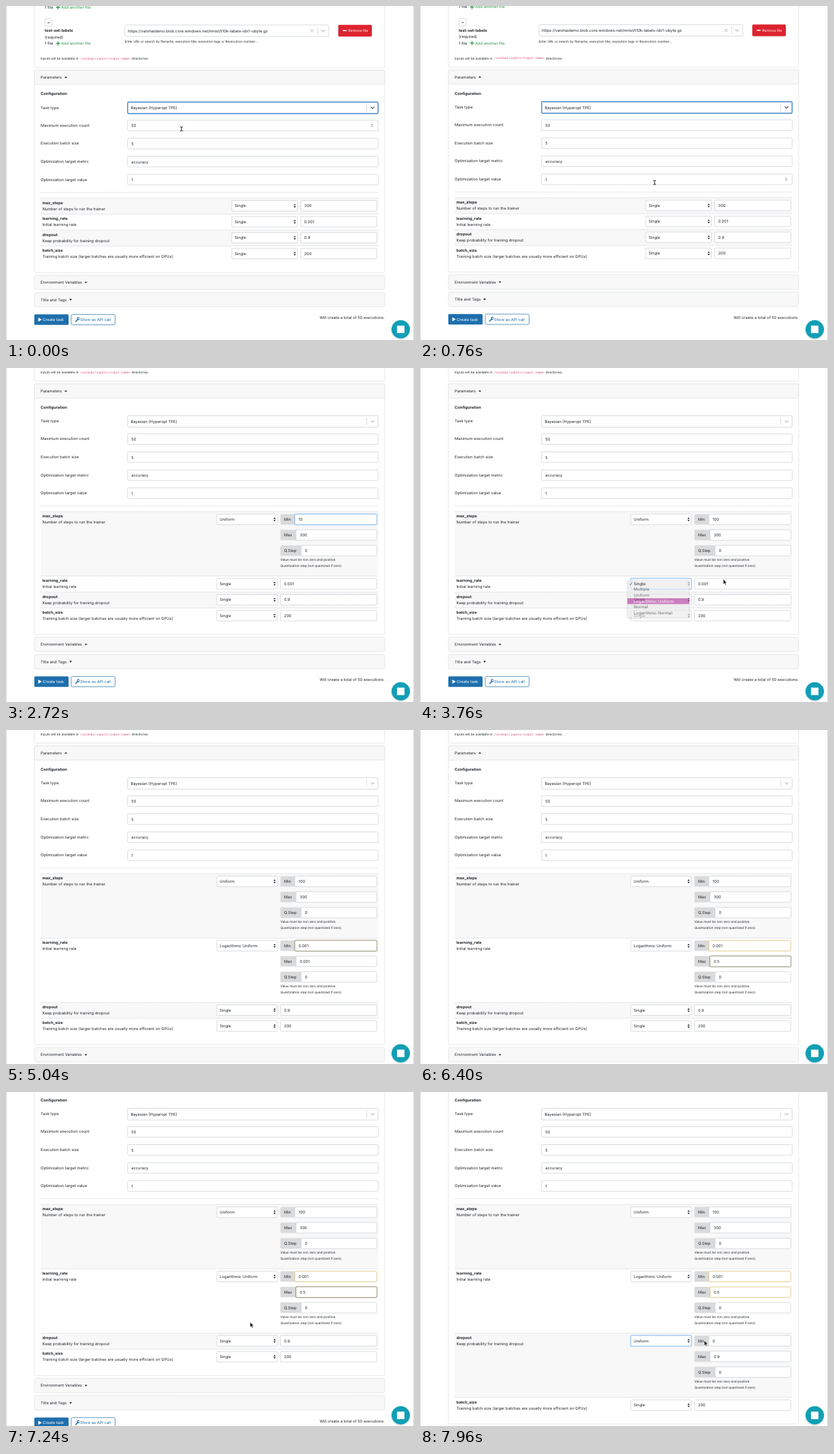
Recreate the animation shown at these times as an HTML page. Size 600x492 px, loop 8 s.

```html
<!DOCTYPE html>
<html lang="en">
<head>
<meta charset="utf-8">
<title>Hyperparameter task form</title>
<style>
  html, body { margin: 0; width: 100%; height: 100%; overflow: hidden; background: #fff; }
  svg { display: block; width: 600px; height: 492px; }
  text { font: 5.77px Inter, "Open Sans", sans-serif; fill: #20252a; text-rendering: geometricPrecision; white-space: pre; }
  .bold { font-weight: 700; }
  .small { font-size: 4.73px; }
  .menu { font-size: 6.1px; }
  .code { font: 4.39px "DejaVu Sans Mono", monospace; fill: #d6437f; }
  .green { fill: #2d9a48; }
  .blue { fill: #1c6ba8; }
  .white { fill: #fff; }
  .end { text-anchor: end; }
  .card { fill: #fff; stroke: #e1e3e5; stroke-width: .8; }
  .head { fill: #f8f8f9; stroke: #e1e3e5; stroke-width: .8; }
  .field { fill: #fff; stroke: #ced3d8; stroke-width: .8; }
  .dash { stroke: #d3d6d9; stroke-width: .8; stroke-dasharray: 1.6 .8; }
  .line { fill: none; stroke-width: 1; stroke-linecap: round; stroke-linejoin: round; }
</style>
</head>
<body>
<svg viewBox="0 0 600 492">
  <g id="page">
    <g id="top"></g>
    <g id="rows"></g>
    <g id="foot"></g>
  </g>
  <g id="menu"></g>
  <path d="M.4 0V492M599.6 0V492" stroke="#c9c9c9" stroke-width=".8"/>
  <circle cx="580.5" cy="477.5" r="14.6" fill="#000" opacity=".08"/>
  <circle cx="580.5" cy="476.3" r="13.5" fill="#109fb6"/>
  <rect x="575" y="470.8" width="11" height="11" fill="#fff"/>
  <path id="arrow" d="M0 0V7.6L1.8 6L3 8.7L4.3 8.1L3.1 5.5H5.4Z" fill="#111" stroke="#fff" stroke-width=".6"/>
  <path id="beam" class="line" d="M-1.6 -3.2Q0 -3.2 0 -2V2Q0 3.2 -1.6 3.2M1.6 -3.2Q0 -3.2 0 -2M0 2Q0 3.2 1.6 3.2" stroke="#222" stroke-width=".8"/>
</svg>
<script>
const LOOP = 8000, ROW = 23.5, EXTRA = 71.3, ROWS_TOP = 283, ITEM = 8.55;
const $ = id => document.getElementById(id);

// Drawing helpers: text and boxes are placed by their vertical centre.
const esc = s => s.replace(/&/g, '&amp;').replace(/</g, '&lt;');
const text = (x, cy, s, cls = '') => `<text x="${x}" y="${cy + 2.1}" class="${cls}">${esc(s)}</text>`;
const rect = (x, y, w, h, attrs, r = 1.6) =>
  `<rect x="${x}" y="${y}" width="${w}" height="${h}" rx="${r}" ${attrs}/>`;
const line = (d, color, width = 1) => `<path class="line" d="${d}" style="stroke:${color};stroke-width:${width}"/>`;
const dash = y => `<path class="dash" d="M51 ${y}H547.5"/>`;
const tri = (x, y, w, h, color = '#222') => `<path d="M${x - w} ${y}h${2 * w}l${-w} ${h}z" fill="${color}"/>`;

const ring = {
  blue: ['#8dbfee', '#80bdff'],
  warn: ['#e3c683', 'none'],
  warnFocus: ['#a5a086', '#8f8b70'],
};
function field(x, cy, w, state, h = 15.6) {
  const y = cy - h / 2, [stroke, glow] = ring[state] || [];
  if (!stroke) return rect(x, y, w, h, 'class="field"');
  return rect(x, y, w, h, `fill="none" stroke="${glow}" stroke-width="2.4" opacity=".4"`) +
    rect(x, y, w, h, `fill="#fff" stroke="${stroke}" stroke-width=".9"`);
}
const select = (x, cy, w, s, state) => field(x, cy, w, state) + text(x + 4.2, cy, s) +
  tri(x + w - 4, cy - .7, 1.7, -2.2) + tri(x + w - 4, cy + .7, 1.7, 2.2);
const chevron = (x, cy, color) => line(`M${x - 2.3} ${cy - 1.1}l2.3 2.3l2.3 -2.3`, color, 1.1);
const plus = (x, cy) => line(`M${x} ${cy}h5M${x + 2.5} ${cy - 2.5}v5`, '#2d9a48', 1.3);
const header = (y, s, x, up) => rect(41.8, y, 515, 21, 'class="head"') + text(51, y + 10.4, s) +
  tri(x, y + (up ? 11.5 : 9.6), 2, up ? -2.3 : 2.3);

const settings = [
  ['Task type', 150, 'Bayesian (Hyperopt TPE)'],
  ['Maximum execution count', 176, '50'],
  ['Execution batch size', 202.6, '5'],
  ['Optimization target metric', 229.2, 'accuracy'],
  ['Optimization target value', 255.8, '1'],
];
const params = [
  ['max_steps', 'Number of steps to run the trainer', '300'],
  ['learning_rate', 'Initial learning rate', '0.001'],
  ['dropout', 'Keep probability for training dropout', '0.9'],
  ['batch_size', 'Training batch size (larger batches are usually more efficient on GPUs)', '200'],
];
const kinds = ['Single', 'Multiple', 'Uniform', 'Logarithmic Uniform', 'Normal', 'Logarithmic Normal'];

// Timeline
const menus = [
  { row: 0, open: 1360, choice: 2, pick: 1780, close: 1960 },
  { row: 1, open: 3320, choice: 3, pick: 3640, close: 3840 },
  { row: 2, open: 7440, choice: 2, pick: 7660, close: 7820 },
];
const focusKeys = [[0, 'task'], [1360, 'kind0'], [2500, 'Min0'], [3320, 'kind1'], [4240, 'Min1'], [5680, 'Max1'], [7440, 'kind2']];
const typing = {
  Min0: { start: 2600, step: 80, value: '100' },
  Min1: { start: 4400, step: 150, value: '0.001' },
  Max1: { start: 5960, step: 120, value: '0.5' },
};
const scrollKeys = [[0, 0], [300, 0], [760, .5], [1000, 0], [2080, 0], [2400, EXTRA], [6560, EXTRA], [7160, EXTRA + 46]];
const mouseKeys = [
  [0, 258, 181], [80, 258, 181], [760, 345, 260], [1240, 384, 294], [1440, 384, 294], [1640, 362, 313],
  [1860, 362, 313], [2100, 400, 262], [2440, 450, 223], [2960, 450, 223], [3240, 352, 318], [3400, 352, 318],
  [3580, 346, 343], [3640, 346, 343], [3760, 446, 311], [4120, 450, 317], [5120, 450, 317], [5380, 450, 318],
  [5640, 452, 341], [6440, 452, 341], [7080, 359, 339], [7240, 359, 339], [7380, 356, 365], [7460, 356, 365],
  [7600, 352, 383], [7680, 352, 383], [7920, 418, 366],
];
const mouseHidden = [[2560, 2960], [4360, 5120], [5800, 6460]];

const ease = p => p * p * (3 - 2 * p);
function track(keys, t) {
  const next = keys.findIndex(k => k[0] > t);
  if (next < 0) return keys[keys.length - 1].slice(1);
  const a = keys[next - 1], b = keys[next], p = ease((t - a[0]) / (b[0] - a[0]));
  return a.slice(1).map((v, i) => v + (b[i + 1] - v) * p);
}

const expanded = (row, t) => menus.some(m => m.row === row && t >= m.close);
const extraAbove = (row, t) => menus.filter(m => m.row < row && t >= m.close).length * EXTRA;
const rowTop = (row, t) => ROWS_TOP + row * ROW + extraAbove(row, t);

function drawTop(focus, hover) {
  const task = focus === 'task';
  let s = rect(41.8, -20, 515, 110.6, 'class="card"') +
    text(57, 1.8, '1 file') + plus(74, 2) + text(81, 1.8, 'Add another file', 'green') +
    rect(57.3, 18.8, 10.6, 11, 'class="field"') + line('M61.6 24.8h2', '#333', .9) +
    text(57, 36.3, 'test-set-labels', 'bold') + text(57, 45.6, '(required)') +
    text(57, 55, '1 file') + plus(74, 55.2) + text(81, 55, 'Add another file', 'green') +
    field(174.8, 36.4, 300, '', 17) +
    text(179.3, 36.6, 'https://valohaidemo.blob.core.windows.net/mnist/t10k-labels-idx1-ubyte.gz') +
    line('M448.2 34.6l3.6 3.6m0 -3.6l-3.6 3.6', '#b5b5b5', .9) +
    line('M458.3 31.5v10', '#d0d0d0', .7) + chevron(466.5, 36.5, '#bbb') +
    text(174.5, 52, 'Enter URL or search by filename, execution title, execution tags or #execution-number...', 'small') +
    rect(488.6, 27.7, 49.4, 17.2, 'fill="#dc2430"') + line('M495.8 36.3h4.6', '#fff', 1.5) +
    `<text x="503.3" y="38.3" class="white" style="font-size:5.25px">Remove file</text>` +
    text(51, 77, 'Inputs will be available in', 'small') +
    text(109, 76.8, '/valohai/inputs/<input name>', 'code') + text(184.7, 77, 'directories.', 'small') +
    rect(41.8, 94.6, 515, 297.8 + hover.extra, 'class="card"') + header(94.6, 'Parameters', 88, true) +
    text(51, 129, 'Configuration', 'bold');
  settings.forEach(([label, cy, value], i) => {
    s += text(51, cy - .4, label);
    s += i ? field(178.8, cy, 368.5) : rect(178.9, cy - 8.5, 368.3, 17,
      `fill="#fff" stroke="${task ? '#4385c9' : '#cbcfd4'}" stroke-width="${task ? 1.4 : .8}"`);
    s += text(i ? 184.3 : 183.4, cy + .2, value);
    if (hover.setting === i && i !== 3)
      s += tri(538.5, cy - .8, 1.5, -1.7, '#888') + tri(538.5, cy + .8, 1.5, 1.7, '#888');
  });
  return s + line('M530.5 145v10', '#d0d0d0', .7) + chevron(539, 150, task ? '#444' : '#bbb') + dash(274.5);
}

function rangeField(label, row, cy, width, value, state) {
  const end = 403.5 + width;
  return rect(403.5, cy - 7.8, width + 2, 15.6, 'fill="#d9dadb"') + field(end, cy, 545.3 - end, state) +
    text(409, cy, label) + text(end + 5.4, cy, value);
}

function drawRows(t, focus) {
  const narrow = t >= menus[0].close;
  return params.map(([name, hint, single], row) => {
    const y = rowTop(row, t), cy = y + 11.3, open = expanded(row, t);
    const pick = menus.find(m => m.row === row);
    const kind = open ? kinds[pick.choice] : 'Single';
    let s = row % 2 ? '' : rect(51, y, 496.5, ROW + (open ? EXTRA : 0), 'fill="#f8f8f9"', 0);
    s += dash(y) + text(53.5, y + 6.5, name, 'bold') + text(53.5, y + 15.6, hint) +
      select(narrow ? 310 : 332, cy, narrow ? 89 : 96.6, kind, focus === 'kind' + row && 'blue');
    if (!open) {
      const x = narrow ? 403.6 : 433.3;
      return s + field(x, cy, 545.3 - x) + text(x + 5.3, cy, single);
    }
    [['Min', 21.3, '0'], ['Max', 23, single], ['Q.Step', 30.5, '0']].forEach(([label, width, initial], i) => {
      const id = label + row, typed = typing[id], started = typed && t >= typed.start;
      const value = started ? typed.value.slice(0, 1 + Math.floor((t - typed.start) / typed.step)) : initial;
      const invalid = started && value.includes('.');
      const state = focus === id ? (invalid ? 'warnFocus' : 'blue') : invalid && 'warn';
      s += rangeField(label, row, cy + 23 * i, width, value, state);
    });
    return s + text(403.5, y + 70.5, 'Value must be non zero and positive.', 'small') +
      text(403.5, y + 79.6, 'Quantization step (not quantized if zero).', 'small');
  }).join('');
}

function drawMenu(t, menu, scroll, mouseY) {
  if (!menu) return '';
  const x = (menu.row ? 310 : 332) - 5, width = menu.row ? 91 : 98;
  const cy = rowTop(menu.row, t) + 11.3 - scroll;
  const fadeFrom = menu.pick + 80;
  const opacity = t < fadeFrom ? 1 : 1 - (t - fadeFrom) / (menu.close - fadeFrom);
  const blink = t >= menu.pick && t < menu.pick + 40;
  const active = blink ? -1 : t >= menu.pick ? menu.choice : Math.round((mouseY - cy) / ITEM);
  let s = rect(x - 1, cy - 5, width + 2, 57, 'fill="#000" opacity=".1"', 3) +
    rect(x, cy - 5.6, width, 55.6, 'fill="#ebebeb" stroke="#cfcfcf" stroke-width=".6"', 2.4);
  kinds.forEach((kind, i) => {
    const y = cy + i * ITEM, on = i === active;
    if (on) s += rect(x, y - ITEM / 2, width, ITEM, 'fill="#b03f9f"', 0);
    s += text(x + 9.3, y, kind, on ? 'menu white' : 'menu');
  });
  s += line(`M${x + 3.2} ${cy + .3}l1.3 1.7l2.4 -4`, active === 0 ? '#fff' : '#333', .8);
  return `<g opacity="${opacity.toFixed(3)}">${s}</g>`;
}

$('foot').innerHTML = header(396.6, 'Environment Variables', 117.5) + header(422, 'Title and Tags', 95) +
  rect(41.6, 454.2, 50.4, 15.6, 'fill="#1d6fad"') +
  '<path d="M47.5 459l5.2 3l-5.2 3z" fill="#fff"/>' + text(54, 461.9, 'Create task', 'white') +
  rect(96, 454.4, 64.4, 15.2, 'fill="#fff" stroke="#3d83b8" stroke-width=".8"') +
  line('M102.5 464.7l3 -3', '#1c6ba8', 1.5) + line('M107.4 459.2a1.6 1.6 0 1 0 .4 2', '#1c6ba8', 1.2) +
  text(109, 461.9, 'Show as API call', 'blue') +
  text(557, 459.2, 'Will create a total of 50 executions.', 'end');

const shown = {};
function put(id, markup) {
  if (shown[id] !== markup) $(id).innerHTML = shown[id] = markup;
}

function render(t) {
  const [scroll] = track(scrollKeys, t), [x, y] = track(mouseKeys, t);
  const focus = focusKeys.filter(k => k[0] <= t).pop()[1];
  const menu = menus.find(m => t >= m.open && t < m.close);
  const hidden = mouseHidden.some(([from, to]) => t >= from && t < to);
  const extra = extraAbove(params.length, t);
  const setting = hidden || menu || x < 178 || x > 547 ? -1
    : settings.findIndex(([, cy]) => Math.abs(y + scroll - cy) < 8);

  put('top', drawTop(focus, { setting, extra }));
  put('rows', drawRows(t, focus));
  put('menu', drawMenu(t, menu, scroll, y));
  $('page').setAttribute('transform', `translate(0 ${-scroll})`);
  $('foot').setAttribute('transform', `translate(0 ${extra})`);

  const beam = !menu && (setting > 0 || x > 433);
  for (const id of ['arrow', 'beam']) {
    $(id).setAttribute('transform', `translate(${x} ${y})`);
    $(id).style.display = !hidden && beam === (id === 'beam') ? '' : 'none';
  }
}

let start;
function tick(now) {
  start ??= now;
  render((now - start) % LOOP);
  requestAnimationFrame(tick);
}
render(0);
requestAnimationFrame(tick);
</script>
</body>
</html>
```
